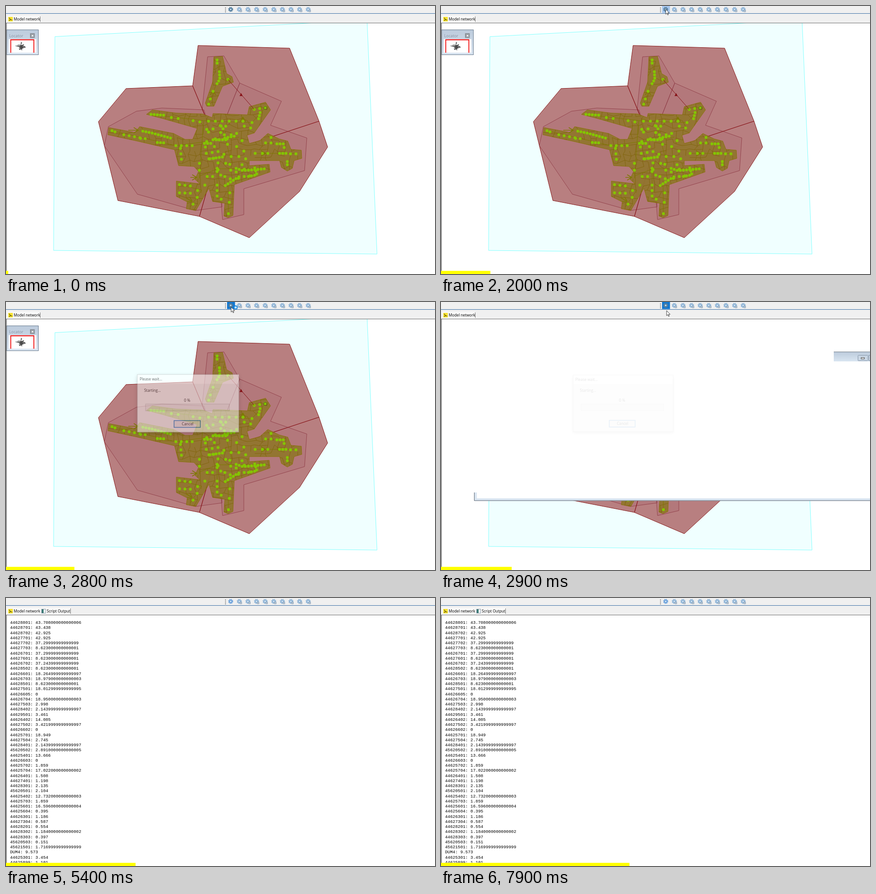
Animation, 947 px wide and 591 px high, one loop 8000 ms. Source, as an HTML page:

```html
<!DOCTYPE html>
<html lang="en">
<head>
<meta charset="utf-8">
<title>Model network</title>
<style>
html, body { margin: 0; width: 100%; height: 100%; overflow: hidden; background: #fff; }
svg { display: block; width: 947px; height: 591px; }
text { font: 8.3px "Open Sans", "Noto Sans", sans-serif; white-space: pre; }
#lines text { font: 9.35px "Liberation Mono", "DejaVu Sans Mono", monospace; }
.dots { fill: none; stroke: #84c400; stroke-width: 6.4; stroke-linecap: round; }
.pipes { fill: none; stroke: #7d7a00; }
.zones { fill: #a0606a; fill-opacity: .22; stroke: #8b3540; stroke-width: .8; }
</style>
</head>
<body>
<svg viewBox="0 0 947 591">
  <defs>
    <path id="north" d="M459 112L478 111 487 149 499 156 502 168 478 177 459 221 443 221 440 214 456 168Z"/>
    <path id="main" d="M310 239L323 229 375 236 434 238 455 246 457 237 533 240 537 222 573 212 584 229 548 280 532 285 537 303 560 297 578 281 603 293 622 298 629 316 652 318 653 336 636 341 632 358 621 364 608 356 604 341H537V352L581 349 583 366 504 394 501 462 490 467 481 463 483 435 456 431 448 402 419 451 398 447 400 432 376 420V386L428 392 417 382 425 365 415 354 381 352 372 317 290 298 225 284 227 268 285 279 295 266 370 281 395 294 412 294 422 270 345 248Z"/>
    <g id="town"><use href="#north"/><use href="#main"/></g>
    <clipPath id="inTown"><use href="#north"/><use href="#main"/></clipPath>
    <clipPath id="view"><rect x="1" y="38" width="946" height="553"/></clipPath>
    <clipPath id="rest"><rect x="1" y="420" width="946" height="171"/></clipPath>
    <linearGradient id="bar" x2="0" y2="1"><stop stop-color="#bccbdc"/><stop offset="1" stop-color="#d9e5f1"/></linearGradient>
    <filter id="shadow" x="-10%" y="-10%" width="120%" height="130%"><feDropShadow dx="0" dy="3" stdDeviation="4" flood-opacity=".3"/></filter>
  </defs>

  <rect width="947" height="591" fill="#fff"/>

  <g id="map" clip-path="url(#view)">
    <path d="M108 67.500L797 31 819 547 105 539Z" fill="#f0ffff" stroke="#80ffff"/>
    <path d="M424 87L626 93 691 254 710 311 648 409 537 511 427 464 247 429 204 255 265 182 412 176Z" fill="#b87f80" stroke="#851414"/>
    <g class="zones">
      <path d="M445 112L481 110 516 170 486 245 442 248 433 228Z"/>
      <path d="M516 170L608 210 584 263 664 291 659 363 525 403V460L478 471 466 320 486 245Z"/>
      <path d="M437 229L344 225 288 232 226 266 217 308 290 415 418 451 477 443 466 320Z"/>
    </g>
    <path d="M412 176L442 248 466 315M691 254L466 328M427 464L466 328" fill="none" stroke="#850f14" stroke-width="1.200"/>
    <use href="#town" fill="#92752e" fill-opacity=".94" stroke="#857000" stroke-width=".8"/>
    <path id="cells" clip-path="url(#inTown)" fill="none" stroke="#7b6000" stroke-width=".7"/>
    <path class="pipes" d="M466 119L471 154 446 221M320 239L447 254 543 257 573 224M234 275L375 308 515 289M550 325H643M427 375L467 359H572M466 366V426M490 385L491 458M383 394L432 406 407 443M436 254L427 380M477 266L498 345"/>
    <g id="arrows" class="pipes" stroke-width="1.600"></g>
    <path class="dots" stroke-dasharray=".01 7" d="M466 119v8M471 145l1 16-9 15M320 239l31 2M234 275l8 3M302 276l20 4 44 12M334 301l18 1M297 292l6 3M561 235l-4 16M598 304h15M604 325h15M621 343v8M508 358l15 5 49-4M549 357l5 15-19 4M475 265l7 10M450 337l34-5M483 291l22-4M457 295l31 0M438 303h15M484 396l26-17M466 358v8"/>
    <path class="dots" stroke-dasharray=".01 12" d="M383 394l35 4M383 412l25 1M423 407l9-1M466 395v32M573 302h13M566 325h20M628 326l16 0M375 308h38M385 314l3 32M543 257h12M413 437l-6 6M514 377l24-2M451 205l-5 16M260 284l55 10M548 228l25-4M475 426h.5"/>
    <path class="dots" stroke-dasharray=".01 15.200" d="M365 246l28 4M413 253l17 3M447 254h78M427 347v28M540 269h.5M585 290h.5M550 325h.5M614 312h.5M490 162h.5M457 188h.5M439 395h.5M494 412h.5M493 433h.5M491 458h.5M422 422h.5"/>
    <path id="core" class="dots"/>
    <circle cx="572.500" cy="225" r="3.500" fill="none" stroke="#3d6b00" stroke-width=".8"/>
    <path d="M490 162L548 228" stroke="#850f14"/>
    <path d="M519 192l3.500 6.500h-7z" fill="#850f14"/>
    <rect x="1.500" y="52.500" width="70" height="55" fill="url(#bar)" stroke="#66788c"/>
    <text x="7" y="69" fill="#8490a0" style="font-size:8.800px">Locator</text>
    <rect x="53" y="60" width="10.500" height="10.500" fill="#8d949c"/>
    <path d="M56.500 63.500l4 4m0-4l-4 4" stroke="#fff" stroke-width="1.200"/>
    <rect x="6" y="73" width="61" height="30" fill="#fff"/>
    <path d="M10.500 103V74.500H61.500V103" fill="none" stroke="#f00000" stroke-width="1.800"/>
    <use href="#town" transform="translate(9.300 73.500) scale(.052)" fill="#4a4a4a" stroke="#777" stroke-width="8"/>
  </g>

  <g id="opening">
    <rect x="73" y="420" width="874" height="18.500" fill="#d9e5f1"/>
    <rect x="79" y="420" width="868" height="13" fill="#fff"/>
    <path d="M73.500 420V438H947" fill="none" stroke="#56606c"/>
    <rect x="867" y="110" width="80" height="21" fill="url(#bar)"/>
    <path d="M867 110H947" stroke="#69737f"/>
    <rect x="920.500" y="117.500" width="22" height="12" rx="1" fill="#c9d6e4" stroke="#8494a6"/>
    <rect x="944.500" y="117.500" width="9" height="12" fill="#c9d6e4" stroke="#8494a6"/>
    <rect x="927.500" y="122.500" width="7" height="3" fill="#fff" stroke="#444"/>
  </g>

  <g id="dialog">
    <rect x="290" y="160" width="224" height="127" fill="#f0f0f0" stroke="#999" stroke-width=".8" filter="url(#shadow)"/>
    <rect x="290.500" y="160.500" width="223" height="20" fill="#fff"/>
    <text x="295" y="173">Please wait...</text>
    <text x="305" y="198">Starting...</text>
    <text x="393" y="220">0 %</text>
    <rect x="308" y="225" width="185" height="15" fill="#e6e6e6" stroke="#bcbcbc"/>
    <rect x="371" y="261.500" width="58" height="15" fill="#e1e1e1" stroke="#0067c0" stroke-width="1.500"/>
    <text x="388" y="272">Cancel</text>
  </g>

  <g id="lines"></g>

  <rect width="947" height="38" fill="#f0f0f0"/>
  <path d="M0 16.500H947" stroke="#3a6ea5"/>
  <rect x="2" y="21" width="73" height="16" fill="#f8f8f8"/>
  <path id="edge" d="M75.500 23V35" stroke="#777"/>
  <path d="M0 37.500H947" stroke="#6a6a6a"/>
  <path d="M.750 38V591" stroke="#777" stroke-width="1.500"/>
  <rect x="5" y="24" width="10" height="10" fill="#f7e233"/>
  <path d="M7 26l3 4 4 1M7 32l3-2" fill="none" stroke="#443c00" stroke-width="1.200"/>
  <text x="17" y="32">Model network</text>
  <g id="tab">
    <rect x="76" y="21" width="66" height="16" fill="#f8f8f8"/>
    <path d="M142.500 23V35" stroke="#777"/>
    <rect x="78.500" y="24.500" width="9" height="9" fill="#fff" stroke="#8a98a8"/>
    <rect x="79" y="25" width="4" height="8" fill="#3c7d77"/>
    <text x="90" y="32">Script Output</text>
  </g>
  <path d="M484.500 3V14" stroke="#555" stroke-width="1.600" stroke-dasharray="1.600 1.600"/>
  <rect id="hover" x="488" width="17.500" height="15.500"/>
  <g id="gears"></g>

  <g id="cursor">
    <path d="M0 0V11.200L2.600 8.800 4.400 12.800 6 12.100 4.200 8.200H7.800Z" fill="#fff" stroke="#111" stroke-width=".8"/>
    <circle id="busy" cx="10" cy="1" r="3.600" fill="#bfe4ff" stroke="#1686dd" stroke-width="2"/>
  </g>
  <rect id="progress" y="584" height="7" fill="#ff0"/>
</svg>

<script>
const $ = id => document.getElementById(id);
const set = (id, attrs) => Object.entries(attrs).forEach(([k, v]) => $(id).setAttribute(k, v));
const show = (id, on) => $(id).style.display = on ? '' : 'none';

const results = `44628801: 43.708000000000006
44628701: 43.438
44628702: 42.925
44627701: 42.925
44627702: 37.29999999999999
44627703: 8.623000000000001
44626701: 37.29999999999999
44627601: 8.623000000000001
44626702: 37.24399999999999
44628502: 8.623000000000001
44626601: 18.264999999999997
44626703: 18.979000000000003
44628501: 8.623000000000001
44627501: 18.012999999999995
44626605: 0
44626704: 18.950000000000003
44627503: 2.998
44628402: 2.1439999999999997
44629501: 3.461
44626402: 14.085
44627502: 3.4219999999999997
44626602: 0
44625701: 18.949
44627504: 2.745
44628401: 2.1439999999999997
45620502: 2.8910000000000005
44625401: 13.666
44626603: 0
44625702: 1.859
44625704: 17.022000000000002
44626401: 1.508
44627401: 1.198
44628301: 2.135
45620501: 2.104
44625402: 12.732000000000003
44625703: 1.859
44625601: 16.596000000000004
44625604: 0.395
44626301: 1.186
44627304: 0.587
44628201: 0.554
44628302: 1.1840000000000002
44628303: 0.397
45620503: 0.151
45621501: 1.7169999999999999
DUM4: 9.573
44625301: 3.454
44625899: 1.101`;
$('lines').innerHTML = results.split('\n')
  .map((line, i) => `<text x="9" y="${57 + i * 11.25}">${line}</text>`).join('');

$('gears').innerHTML = Array.from({ length: 10 }, (_, i) => {
  const x = 496 + 19 * i, color = i ? '#8fb4d6' : 'currentColor';
  return `<g fill="none" stroke="${color}"><circle cx="${x}" cy="7.5" r="4.7" stroke-width="1.8" stroke-dasharray="2 1.69"/>
    <circle cx="${x}" cy="7.5" r="3" fill="#d5e6f5" stroke-width="2.6"/></g>` +
    (i ? `<rect x="${x + 1.5}" y="9" width="4" height="4" fill="#b9c8d6" stroke="#7d93a8" stroke-width=".7"/>` : '');
}).join('');

// Flow arrows: tip, angle, shaft length.
const arrow = (x, y, angle, shaft) =>
  `<path transform="translate(${x} ${y}) rotate(${angle})" d="M${-shaft} 0H0M-10 -6L0 0 -10 6"/>`;
$('arrows').innerHTML = arrow(292, 274, 0, 22) + arrow(421, 378, 0, 14) + arrow(457, 186, -90, 8) +
  arrow(411, 431, 30, 15) + arrow(523, 245, -90, 6) + arrow(573, 325, 0, 8);

let seed = 7;
const rand = () => (seed = seed * 16807 % 2147483647) / 2147483647;
const jitter = (x, y, step, cols, rows, wobble) => Array.from({ length: cols * rows }, (_, i) =>
  [x + i % cols * step + rand() * wobble, y + Math.floor(i / cols) * step + rand() * wobble].map(Math.round));

// Plot boundaries: a jittered grid with some edges missing.
const cols = 35, grid = jitter(220, 105, 13, cols, 29, 9);
$('cells').setAttribute('d', grid.map((p, i) =>
  [i + 1, i + cols].filter(j => grid[j] && (j > i + 1 || j % cols) && rand() < .68)
    .map(j => `M${p}L${grid[j]}`).join('')).join(''));

// Nodes of the town centre.
$('core').setAttribute('d', jitter(440, 264, 13.5, 7, 9, 9)
  .filter(() => rand() < .74).map(p => `M${p}h.1`).join(''));

// Cursor stops: frame, x, y.
const stops = [[14, 497, -14], [17, 496, 6], [20, 496, 7], [28, 497, 11], [29, 498, 19],
  [32, 498, 72], [39, 498, 72], [44, 950, 60]];

function cursorAt(n) {
  const i = stops.findIndex(s => s[0] >= n);
  if (i < 1) return [-50, -50];
  const [a, x, y] = stops[i - 1], [b, u, v] = stops[i], k = (n - a) / (b - a);
  return [x + (u - x) * k, y + (v - y) * k];
}

function draw(now) {
  const n = Math.floor(now % 8000 / 100);
  const done = n >= 30, pressed = n >= 23;
  show('map', !done);
  $('map').setAttribute('clip-path', n === 29 ? 'url(#rest)' : 'url(#view)');
  show('opening', n === 29);
  show('lines', done);
  show('tab', done);
  show('edge', !done);

  const fade = n === 23 ? .5 : n < 28 ? 1 : n === 28 ? .55 : .09;
  const size = n === 23 ? 1 : n < 28 ? 1.02 : n === 28 ? 1 : .985;
  show('dialog', n >= 23 && n < 30);
  set('dialog', { opacity: fade, transform: `translate(402 223.5) scale(${size}) translate(-402 -223.5)` });

  show('hover', n >= 17 && n < 37);
  set('hover', { fill: pressed ? '#1177d1' : '#a9c9f0' });
  $('gears').style.color = n < 37 ? '#557f9f' : '#6ea3dc';

  set('cursor', { transform: `translate(${cursorAt(n)})` });
  show('busy', n >= 23 && n < 29);
  set('progress', { width: Math.round(5.2 * (n + 1)) });
}

const start = performance.now();
function tick() {
  draw(performance.now() - start);
  requestAnimationFrame(tick);
}
tick();
</script>
</body>
</html>
```
